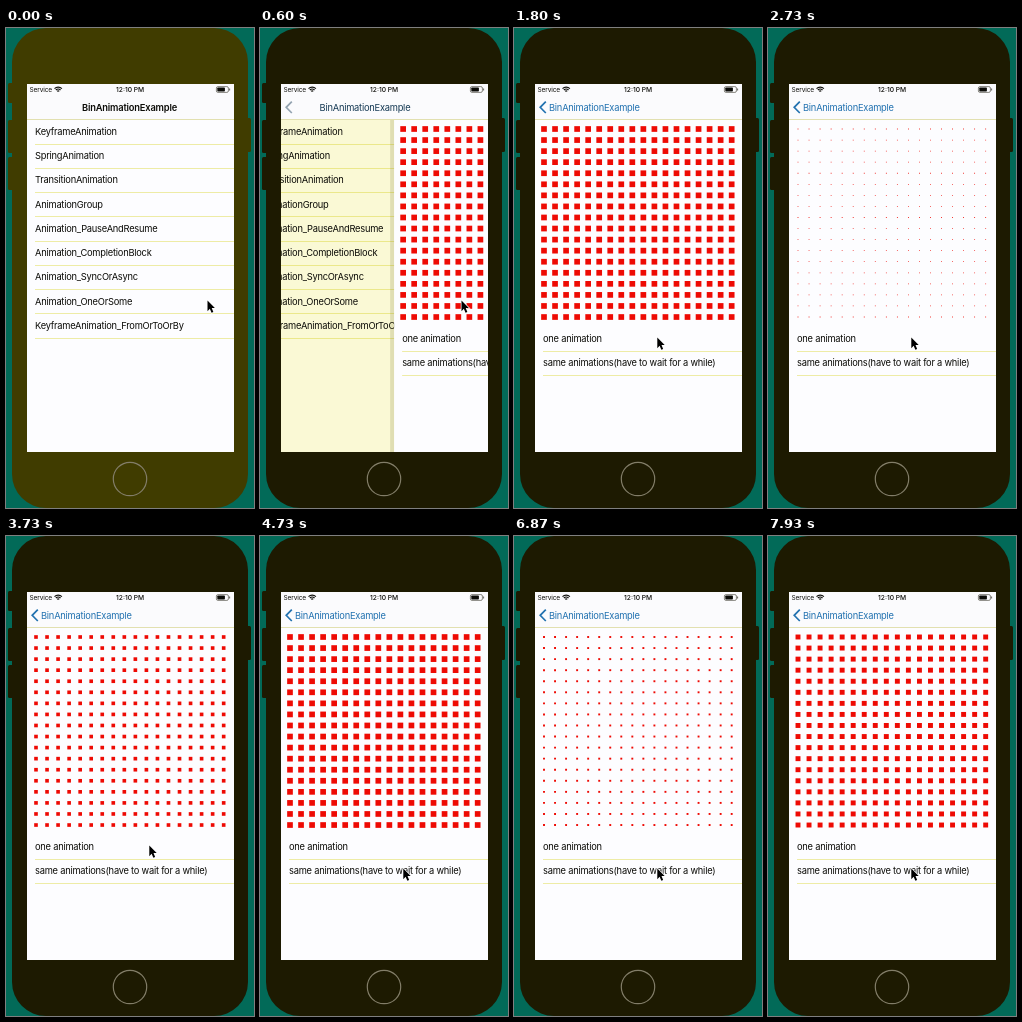
Animation, 248 px wide and 480 px high, one loop 8000 ms. Source, as an HTML page with a canvas:

```html
<!DOCTYPE html>
<html lang="en">
<head>
<meta charset="utf-8">
<title>Animation example</title>
<style>
  html, body { margin: 0; width: 100%; height: 100%; overflow: hidden; background: #026a58; }
  canvas { display: block; width: 248px; height: 480px; }
</style>
</head>
<body>
<canvas id="stage"></canvas>
<script>
const W = 248, H = 480, LOOP = 8000;
const canvas = document.getElementById('stage');
const ratio = window.devicePixelRatio || 1;
canvas.width = W * ratio;
canvas.height = H * ratio;
const ctx = canvas.getContext('2d');

const SCREEN = { x: 21, y: 56, w: 207, h: 368 };
const NAV_BOTTOM = 91.5;
const ROW = 24.25;
const INK = '#0c0c08', RULE = '#eeeca6', PAPER = '#fdfdff', WALL = '#026a58';
const INK_RGB = [12, 12, 8], BLUE_RGB = [34, 114, 176];
const TITLE = 'BinAnimationExample';
const MENU = ['KeyframeAnimation', 'SpringAnimation', 'TransitionAnimation', 'AnimationGroup',
  'Animation_PauseAndResume', 'Animation_CompletionBlock', 'Animation_SyncOrAsync',
  'Animation_OneOrSome', 'KeyframeAnimation_FromOrToOrBy'];
const OPTIONS = ['one animation', 'same animations(have to wait for a while)'];

const PUSH_START = 483;
const GROW_STARTS = [2450, 6200], GROW_TIME = 2000;
const CURSOR_PATH = [[0, 201.5, 272.5], [1050, 201.5, 272.5], [1700, 143.3, 309.5],
  [3850, 143.3, 309.5], [4500, 143.3, 332.5], [LOOP, 143.3, 332.5]];

const mix = (a, b, v) => a + (b - a) * v;
const smooth = v => v * v * (3 - 2 * v);

function box(x, y, w, h, color, radius = 0) {
  ctx.fillStyle = color;
  ctx.beginPath();
  ctx.roundRect(x, y, w, h, radius);
  ctx.fill();
}

function label(text, x, y, { size = 9.3, weight = 400, spacing = -0.23, color = INK } = {}) {
  ctx.font = `${weight} ${size}px Inter, Roboto, sans-serif`;
  ctx.letterSpacing = spacing + 'px';
  ctx.fillStyle = color;
  ctx.fillText(text, x, y);
}

function stroke(color, width, trace) {
  ctx.strokeStyle = color;
  ctx.lineWidth = width;
  ctx.beginPath();
  trace();
  ctx.stroke();
}

function phone(bodyColor) {
  box(0, 0, W, H, WALL);
  for (const [x, y, h] of [[2, 55, 20], [2, 92, 33], [2, 129, 33], [239, 90, 34]])
    box(x, y, 6, h, bodyColor, 1.5);
  box(6, 0, 236, 480, bodyColor, 34);
  stroke('#827d68', 1.2, () => ctx.arc(124, 451, 16.7, 0, Math.PI * 2));
}

function rows(items, top) {
  items.forEach((text, i) => {
    label(text, 29, top + 15.3 + i * ROW);
    box(29, Math.round(top + (i + 1) * ROW - 0.2), 199, 1, RULE);
  });
}

function menuPage(push) {
  ctx.save();
  ctx.translate(-0.3 * SCREEN.w * push, 0);
  rows(MENU, NAV_BOTTOM);
  ctx.restore();
  ctx.globalCompositeOperation = 'multiply';
  ctx.globalAlpha = Math.min(1, push * 2);
  box(SCREEN.x, NAV_BOTTOM, SCREEN.w, 333, '#fbfad0');
  ctx.globalAlpha = 1;
  ctx.globalCompositeOperation = 'source-over';
}

function squares(scale) {
  const side = 5.7 * scale;
  for (let row = 0; row < 18; row++)
    for (let col = 0; col < 18; col++)
      box(30 + col * 11.04 - side / 2, 101 + row * 11.06 - side / 2, side, side, '#ee0a04');
}

function detailPage(push, scale) {
  ctx.save();
  ctx.translate(SCREEN.w * (1 - push), 0);
  if (push < 1) box(SCREEN.x - 4, NAV_BOTTOM, 4, 333, 'rgba(120,115,40,.2)');
  box(SCREEN.x, NAV_BOTTOM, SCREEN.w, 333, PAPER);
  squares(scale);
  rows(OPTIONS, 298.5);
  ctx.restore();
}

function statusBar() {
  label('Service', 23.5, 64, { size: 6.6, spacing: -0.15 });
  label('12:10 PM', 110, 64, { size: 6.7, weight: 500, spacing: 0 });
  for (const r of [1.4, 3.3, 5.2])
    stroke(INK, 1.2, () => ctx.arc(52.2, 64.3, r, -Math.PI * 0.75, -Math.PI * 0.25));
  stroke('#55544a', 0.7, () => ctx.roundRect(210.4, 58.6, 12, 5.8, 1.5));
  box(211.3, 59.5, 7.6, 4, INK, 0.7);
  box(223.2, 60.4, 0.9, 2.2, '#55544a');
}

// The title slides left and turns into the back button.
function navBar(push) {
  box(SCREEN.x, SCREEN.y, SCREEN.w, NAV_BOTTOM - SCREEN.y, '#fbfbfd');
  box(SCREEN.x, NAV_BOTTOM - 0.5, SCREEN.w, 1, '#e2e0b0');
  statusBar();
  if (push === 0) {
    label(TITLE, 76, 82.8, { weight: 600, spacing: -0.17 });
    return;
  }
  const tint = `rgb(${INK_RGB.map((c, i) => mix(c, BLUE_RGB[i], push))})`;
  label(TITLE, mix(80, 35, push), 82.8, { color: tint });
  ctx.globalAlpha = push;
  stroke(tint, 1.7, () => {
    ctx.moveTo(31.8, 73.6);
    ctx.lineTo(26.2, 79.3);
    ctx.lineTo(31.8, 85);
  });
  ctx.globalAlpha = 1;
}

function cursor(time) {
  const next = CURSOR_PATH.findIndex(point => point[0] > time);
  const [t0, x0, y0] = CURSOR_PATH[next - 1], [t1, x1, y1] = CURSOR_PATH[next];
  const v = smooth((time - t0) / (t1 - t0));
  ctx.save();
  ctx.translate(mix(x0, x1, v), mix(y0, y1, v));
  ctx.scale(0.9, 0.95);
  ctx.beginPath();
  for (const [x, y] of [[0, 0], [0, 11.2], [2.6, 8.8], [4.5, 13], [6.5, 12.1], [4.7, 8], [8.2, 8]])
    ctx.lineTo(x, y);
  ctx.closePath();
  ctx.strokeStyle = '#fff';
  ctx.lineWidth = 1.6;
  ctx.stroke();
  ctx.fillStyle = '#000';
  ctx.fill();
  ctx.restore();
}

// Critically damped spring for the page push.
function pushAt(time) {
  const s = Math.max(0, time - PUSH_START) * 0.013;
  const v = 1 - Math.exp(-s) * (1 + s);
  return v > 0.998 ? 1 : v;
}

function scaleAt(time) {
  const start = GROW_STARTS.find(s => time >= s && time < s + GROW_TIME);
  return start === undefined ? 1 : (time - start) / GROW_TIME;
}

function draw(time) {
  const push = pushAt(time);
  ctx.setTransform(ratio, 0, 0, ratio, 0, 0);
  phone(push > 0 ? '#1d1a01' : '#403c00');
  ctx.save();
  ctx.beginPath();
  ctx.rect(SCREEN.x, SCREEN.y, SCREEN.w, SCREEN.h);
  ctx.clip();
  box(SCREEN.x, SCREEN.y, SCREEN.w, SCREEN.h, PAPER);
  if (push < 1) menuPage(push);
  if (push > 0) detailPage(push, scaleAt(time));
  navBar(push);
  ctx.restore();
  cursor(time);
}

const origin = performance.now();
function tick() {
  draw((performance.now() - origin) % LOOP);
  requestAnimationFrame(tick);
}
tick();
</script>
</body>
</html>
```
